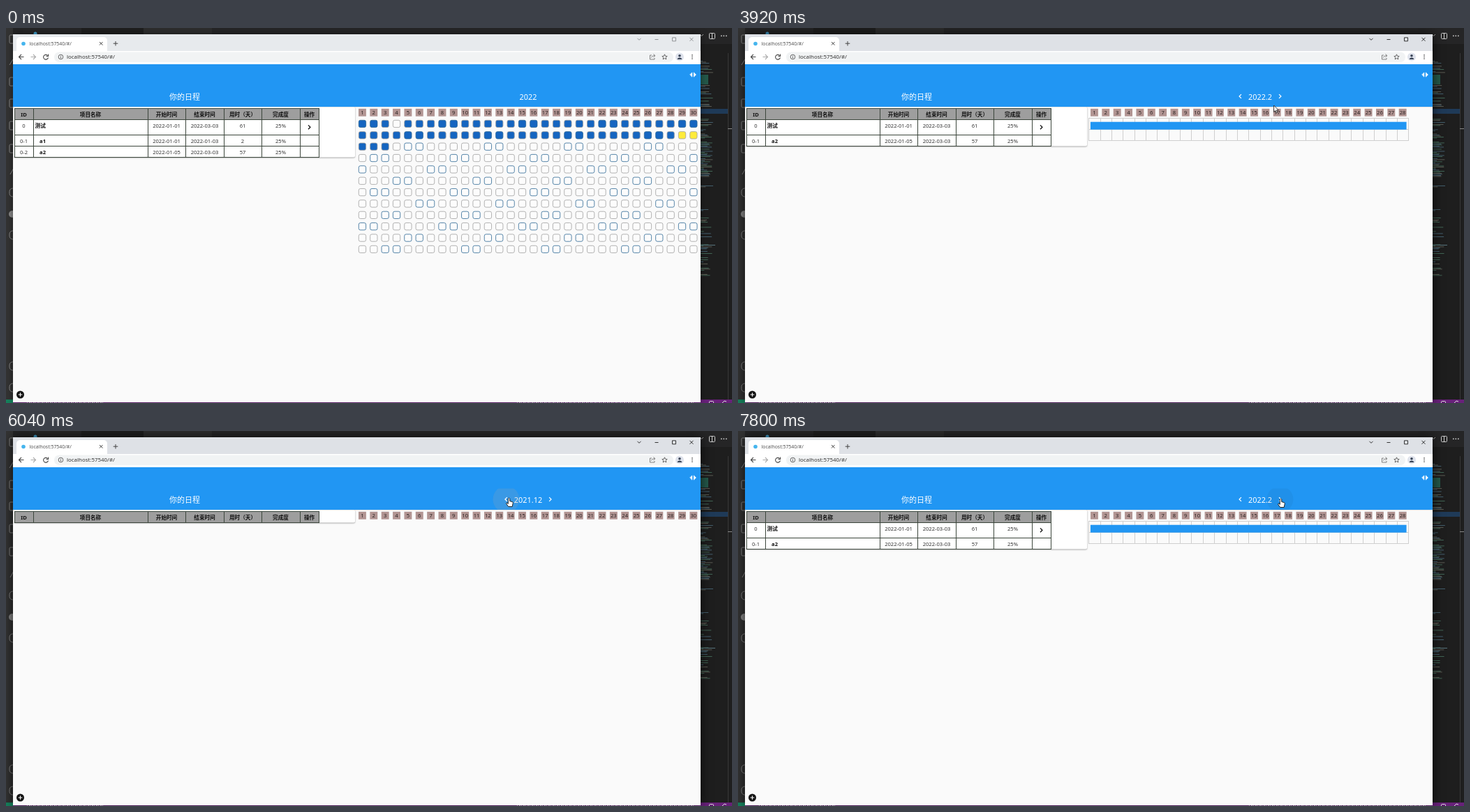
An HTML page with a canvas for the animation above (8000 ms loop, 1040 by 538 pixels).

```html
<!DOCTYPE html>
<html lang="zh-CN">
<head>
<meta charset="utf-8">
<style>
html, body { margin: 0; width: 1040px; height: 538px; overflow: hidden; background: #1e1e1e }
canvas { display: block }
</style>
</head>
<body>
<canvas id="stage" width="1040" height="538"></canvas>
<script>
const g = document.getElementById('stage').getContext('2d');
const FONT = '"Noto Sans","Noto Sans CJK SC","Noto Sans CJK",sans-serif';
const BLUE = '#2196f3', STEP = 16.36, LOOP = 8000;

function rect(x, y, w, h, fill) { g.fillStyle = fill; g.fillRect(x, y, w, h); }

function box(x, y, w, h, r, fill, stroke) {
  g.beginPath();
  g.roundRect(x, y, w, h, r);
  if (fill) { g.fillStyle = fill; g.fill(); }
  if (stroke) { g.strokeStyle = stroke; g.stroke(); }
}

function circle(x, y, r, fill, stroke) { box(x - r, y - r, 2 * r, 2 * r, r, fill, stroke); }

function path(d, x, y, stroke, fill, width = 1) {
  const p = new Path2D(d);
  g.save();
  g.translate(x, y);
  g.lineWidth = width;
  if (fill) { g.fillStyle = fill; g.fill(p); }
  if (stroke) { g.strokeStyle = stroke; g.stroke(p); }
  g.restore();
}

// y is the vertical middle of the text
function text(s, x, y, size = 7.6, color = '#222', align = 'center', weight = 400) {
  g.font = `${weight} ${size}px ${FONT}`;
  g.textAlign = align;
  g.fillStyle = color;
  g.fillText(s, x, y + size * 0.37);
}

function lines(xs, ys, x0, x1, y0, y1, color) {
  g.fillStyle = color;
  for (const x of xs) g.fillRect(Math.round(x), y0, 1, y1 - y0 + 1);
  for (const y of ys) g.fillRect(x0, y, x1 - x0 + 1, 1);
}

function random(seed) {
  return () => (seed = seed * 16807 % 2147483647) / 2147483647;
}

// ---------- editor behind the browser ----------
function drawEditor() {
  rect(0, 0, 1040, 538, '#1e1e1e');
  rect(0, 0, 1040, 23, '#252526');
  rect(197, 0, 98, 10, '#2d2d2d');
  rect(108, 0, 89, 10, '#1e1e1e');
  circle(42, 8, 2.5, '#42a5d5');
  rect(0, 0, 10, 538, '#333');
  g.lineWidth = 1;
  for (const y of [16, 77, 108, 140, 173, 236, 297, 485, 516])
    box(5, y - 6, 9, 12, y > 230 ? 6 : 1.5, null, '#8a8a8a');
  path('M5 53L10 45M6 210L11 201', 0, 0, '#8a8a8a');
  circle(9, 267, 5, '#8a8a8a');
  box(1007.5, 7.5, 8, 8, 1, null, '#ccc');
  rect(1011, 8, 1, 7, '#ccc');
  for (let i = 0; i < 3; i++) rect(1024 + i * 3.5, 10.5, 1.6, 1.6, '#ccc');
  path('M994 9l2.5 2.5 2.5-2.5', 0, 0, '#aaa');

  const rnd = random(77);
  const blocks = [[47, 66, .5], [82, 115, .5], [129, 160, .5], [163, 214, .9], [226, 229, 1],
    [260, 262, 1], [272, 300, .6], [309, 318, .8], [320, 356, .6]];
  for (const [from, to, density] of blocks)
    for (let y = from; y < to; y += 1.5) {
      const w = 3 + rnd() * 15;
      if (rnd() < density) rect(995, y, w, .8, ['#4d6f80', '#4a7763', '#6b6b60'][Math.floor(rnd() * 3)]);
    }
  rect(995, 67, 11, 14, '#24584a');
  rect(995, 311, 21, 1, '#58747c');
  rect(995, 116, 39, 7, '#1f3a58');
  rect(1034, 36, 1, 497, '#383838');
  rect(1034, 144, 6, 1, '#888');
  rect(0, 533, 1040, 5, '#68217a');
  rect(0, 533, 10, 5, '#16825d');
  box(1007.5, 535.5, 6, 4, 1, null, '#ddd');
  path('M1026 538l3-3 3 1', 0, 0, '#ddd');
}

// ---------- browser window ----------
function drawBrowser(active) {
  g.save();
  g.shadowColor = active ? 'rgba(0,0,0,.75)' : 'rgba(0,0,0,.5)';
  g.shadowBlur = active ? 14 : 9;
  rect(10, 9, 985, 528, '#fafafa');
  g.restore();
  for (let x = 30; x < 985; x += 3)
    if (x < 140 || x > 730) rect(x, 537, 1 + x % 2, 1, '#8d7a92');

  rect(10, 9, 985, 24, active ? '#dee1e6' : '#e7eaed');
  box(15, 13, 130, 20, [5, 5, 0, 0], '#fff');
  circle(25, 22.5, 2.8, '#45b5ee');
  text('localhost:57540/#/', 33.5, 22.3, 6.9, '#555', 'left');
  path('M134 20l4.5 4.5M138.500 20l-4.500 4.500M157 19v6.500M153.700 22.200h6.600', 0, 0, '#444');
  const control = active ? '#222' : '#8b8d90';
  path('M904.500 14.800l2.500 2.500 2.500-2.500M929.500 16.500h5M954.500 13.800h5v5h-5zM979.500 13.800l5 5M984.500 13.800l-5 5', 0, 0, control, null, .9);

  rect(10, 33, 985, 19, '#fff');
  box(69, 34.5, 887, 14.5, 7.2, '#f1f3f4');
  const arrow = 'M3.500 0H-3.500M0-3.500L-3.500 0 0 3.500';
  path(arrow, 22, 41.5, '#444', null, 1.1);
  g.save();
  g.translate(78, 0);
  g.scale(-1, 1);
  path(arrow, 39, 41.5, '#aaa', null, 1.1);
  g.restore();
  path('M2.600-2A3.400 3.400 0 1 0 3.400.8M3.600-4v3H.6', 57, 41.5, '#444', null, 1.1);
  g.lineWidth = .9;
  circle(78.5, 41.5, 3.3, null, '#555');
  path('M0-1.800v.9M0-.2v2.100', 78.5, 41.5, '#555');
  text('localhost:57540/#/', 87, 41.3, 7.9, '#333', 'left');
  path('M-1-2.500H-3.500V3.500H3V1.500M-1.500 1C-1-1 .5-1.800 3.500-1.800M1.500-4L4-1.800 1.500.3', 926, 41.5, '#666', null, .8);
  path('M0-3.700L1.100-1.200 3.700-1 1.700.8 2.300 3.400 0 2-2.300 3.400-1.700.8-3.700-1-1.100-1.200z', 943.5, 41.5, '#444', null, .8);
  circle(965, 41.5, 6, '#dfe3ec');
  circle(965, 39.8, 1.8, '#394457');
  path('M-3.300 3.500Q-3 .9 0 .9T3.300 3.500z', 965, 41.5, null, '#394457');
  for (let i = -1; i < 2; i++) circle(983, 41.5 + i * 2.6, .8, '#444');
}

// ---------- page content ----------
const COLS = [12, 39, 203, 257, 312, 366, 421, 448];
const HEADS = ['ID', '项目名称', '开始时间', '结束时间', '用时（天）', '完成度', '操作'];
const A1 = ['a1', '2022-01-01', '2022-01-03', '2'];
const A2 = ['a2', '2022-01-05', '2022-03-03', '57'];
const VIEWS = {
  year: { title: '2022', ids: ['0-1', '0-2'], tasks: [A1, A2] },
  jan: { title: '2022.1', ids: ['0-1', '0-1'], tasks: [A1, A2], days: 31, bars: [[1, 3], [5, 31]] },
  feb: { title: '2022.2', ids: ['0-1'], tasks: [A2], days: 28, bars: [[1, 28]] },
  dec: { title: '2021.12', ids: [], tasks: [], days: 31 }
};

function drawTable(view) {
  const count = view.tasks.length;
  const ys = [115, 131];
  if (count) ys.push(153, 169);
  if (count > 1) ys.push(185);
  const bottom = ys[ys.length - 1];
  g.save();
  g.shadowColor = 'rgba(0,0,0,.4)';
  g.shadowBlur = 2;
  g.shadowOffsetY = .8;
  box(11, 113, 489, bottom - 112.5, 2, '#fff');
  g.restore();
  rect(12, 115, 436, 16, '#9e9e9e');
  const mid = i => (COLS[i] + COLS[i + 1]) / 2;
  HEADS.forEach((s, i) => text(s, mid(i), 123.7, 7.6, '#111', 'center', 700));

  function row(id, [name, ...cells], y, indent) {
    text(id, mid(0), y, 7.6, '#333');
    text(name, 41.6 + indent, y, 7.6, '#111', 'left', 700);
    [...cells, '25%'].forEach((s, i) => text(s, mid(i + 2), y, 7.6, '#333'));
  }
  if (count) {
    row('0', ['测试', '2022-01-01', '2022-03-03', '61'], 140.3, 0);
    path('M-1.500-2.900L1.400 0-1.500 2.900', 434.5, 142.3, '#111', null, 1.3);
  }
  view.tasks.forEach((task, i) => row(view.ids[i], task, 162 + i * 16.2, 6.5));
  lines(COLS, ys, 12, 448, 115, bottom, '#3c463c');
}

const dayX = day => 510.4 + (day - 1) * STEP;

function drawDays(count) {
  for (let d = 1; d <= Math.min(count, 30); d++) {
    rect(dayX(d) - 5.4, 115.8, 10.9, 10.9, '#b29593');
    text(d, dayX(d), 121.2, 7.6, '#2a2222');
  }
}

function drawYear() {
  drawDays(30);
  g.lineWidth = .8;
  for (let m = 0; m < 12; m++)
    for (let d = 1; d <= 30; d++) {
      const weekend = new Date(2022, m, d).getDay() % 6 === 0;
      const missing = m === 1 && d > 28;
      const busy = m === 0 ? d !== 4 : m === 1 || m === 2 && d < 4;
      box(dayX(d) - 5.1, 132.3 + m * STEP, 10.3, 10.3, 2.4,
        missing ? '#ffeb3b' : busy ? '#1565c0' : '#fcfcfc',
        weekend && !missing ? '#2c6795' : '#a0a0a0');
    }
}

function drawMonth({ days, bars, tasks }) {
  drawDays(days);
  if (!bars) return;
  const edge = day => 502.2 + (day - 1) * STEP;
  const xs = Array.from({ length: days + 1 }, (_, i) => edge(i + 1));
  const ys = [129, 145, 161, 178].slice(0, tasks.length + 2);
  lines(xs, ys, 502, Math.min(960, edge(days + 1)) + (days > 28 ? 40 : 0), 129, ys[ys.length - 1], '#cfcfcf');
  for (const [a, b] of bars) rect(edge(a) + 2.7, 134.7, edge(b + 1) - edge(a) - 5.4, 11, BLUE);
}

// ---------- timing ----------
const CLICKS = [
  { press: 2840, change: 3360, end: 3360, view: 'feb', button: 'toggle' },
  { press: 4560, change: 4680, end: 5320, view: 'jan', button: 'prev' },
  { press: 5880, change: 6000, end: 6280, view: 'dec', button: 'prev' },
  { press: 6720, change: 6840, end: 7040, view: 'jan', button: 'next' },
  { press: 7400, change: 7520, end: 7800, view: 'feb', button: 'next' }
];
const TRACK = [[120, 1009, 531], [440, 800, 392], [520, 772, 377], [640, 782, 383], [1200, 782, 383],
  [1400, 852, 180], [1520, 885, 101], [1760, 955, 76], [2000, 982, 66], [3720, 982, 66],
  [3920, 768, 111], [4080, 704, 113], [4200, 688, 107], [4480, 720.5, 96], [6120, 720.5, 96],
  [6480, 777.5, 97]];

function pointer(t) {
  const i = TRACK.findIndex(k => k[0] > t);
  if (i < 0) return TRACK[TRACK.length - 1].slice(1);
  const [t0, x0, y0] = TRACK[i - 1], [t1, x1, y1] = TRACK[i];
  const k = (t - t0) / (t1 - t0);
  return [x0 + (x1 - x0) * k, y0 + (y1 - y0) * k];
}

function drawPointer(x, y, hand) {
  if (hand)
    path('M-1.200 1Q0-.8 1.200 1V4.600L4.800 5.600Q6 6 5.700 7.600L4.700 12.500H-.8L-3.800 8.300Q-4 6.800-2.600 7.200L-1.200 8.400z',
      x, y, '#111', '#fff', .9);
  else
    path('M0 0V9.500L2.200 7.500 3.700 11 5.300 10.300 3.800 6.900H6.700z', x, y, '#111', '#fff', .8);
}

function draw(t) {
  drawEditor();
  drawBrowser(t >= 2840);
  const done = CLICKS.filter(c => t >= c.change).pop();
  const view = VIEWS[done ? done.view : 'year'];
  const isYear = view === VIEWS.year;

  g.save();
  g.beginPath();
  g.rect(10, 52, 985, 485);
  g.clip();
  drawTable(view);
  isYear ? drawYear() : drawMonth(view);
  rect(10, 113, 985, 1, 'rgba(0,0,0,.08)');
  rect(10, 52, 985, 61, BLUE);
  text('你的日程', 256, 98.5, 11, '#fff', 'center', 500);
  text(view.title, 748, 98.5, 10.9, '#fff', 'center', 500);

  const buttons = { toggle: [984, 67] };
  if (!isYear) {
    const off = g.measureText(view.title).width / 2 + 11.4;
    buttons.prev = [748 - off, 98];
    buttons.next = [748 + off, 98];
  }
  const [px, py] = t < 120 ? [-50, -50] : pointer(t);
  const hovered = Object.keys(buttons).find(k => Math.hypot(px - buttons[k][0], py - buttons[k][1]) < 13);

  function ink(name, radius, color) {
    const [x, y] = buttons[name];
    g.save();
    g.beginPath();
    g.rect(10, name === 'toggle' ? 52 : 82.5, 985, 30.5);
    g.clip();
    circle(x, y, radius, color);
    g.restore();
  }
  if (hovered && hovered !== 'toggle') ink(hovered, 19, 'rgba(0,0,0,.045)');
  const click = CLICKS.find(c => t >= c.press && t < c.end);
  if (click) {
    const grow = Math.min(1, (t - click.press + 40) / 200);
    const fade = click.change === click.end ? 1 : Math.min(1, (click.end - t) / (click.end - click.change));
    ink(click.button, 8 + 11 * grow, `rgba(200,200,200,${.18 * fade})`);
  }

  path('M-1.200-2.500V2.500L-3.700 0zM1-3.800V3.800L4.900 0z', 984, 67, null, '#fff');
  path('M-1.200-3.100V3.100L-4.300 0z', 984, 67, '#fff', null, .9);
  if (!isYear) {
    path('M1.400-2.900L-1.500 0 1.400 2.900', ...buttons.prev, '#fff', null, 1.2);
    path('M-1.400-2.900L1.500 0-1.400 2.900', ...buttons.next, '#fff', null, 1.2);
  }
  circle(20.5, 526, 5.5, '#151515');
  path('M-2.800 0H2.800M0-2.800V2.800', 20.5, 526, '#fff', null, 1.1);
  g.restore();

  const tip = Math.min((t - 1380) / 75, (1680 - t) / 75, 1);
  if (tip > 0) {
    g.globalAlpha = tip;
    box(840, 183, 29, 13, 2.2, 'rgba(97,97,97,.92)');
    text('3月22日', 854.5, 189.6, 6.5, '#fff');
    g.globalAlpha = 1;
  }
  if (t >= 120) drawPointer(px, py, hovered && t >= 2040);
}

function tick() {
  draw(performance.now() % LOOP);
  requestAnimationFrame(tick);
}
tick();
</script>
</body>
</html>
```
